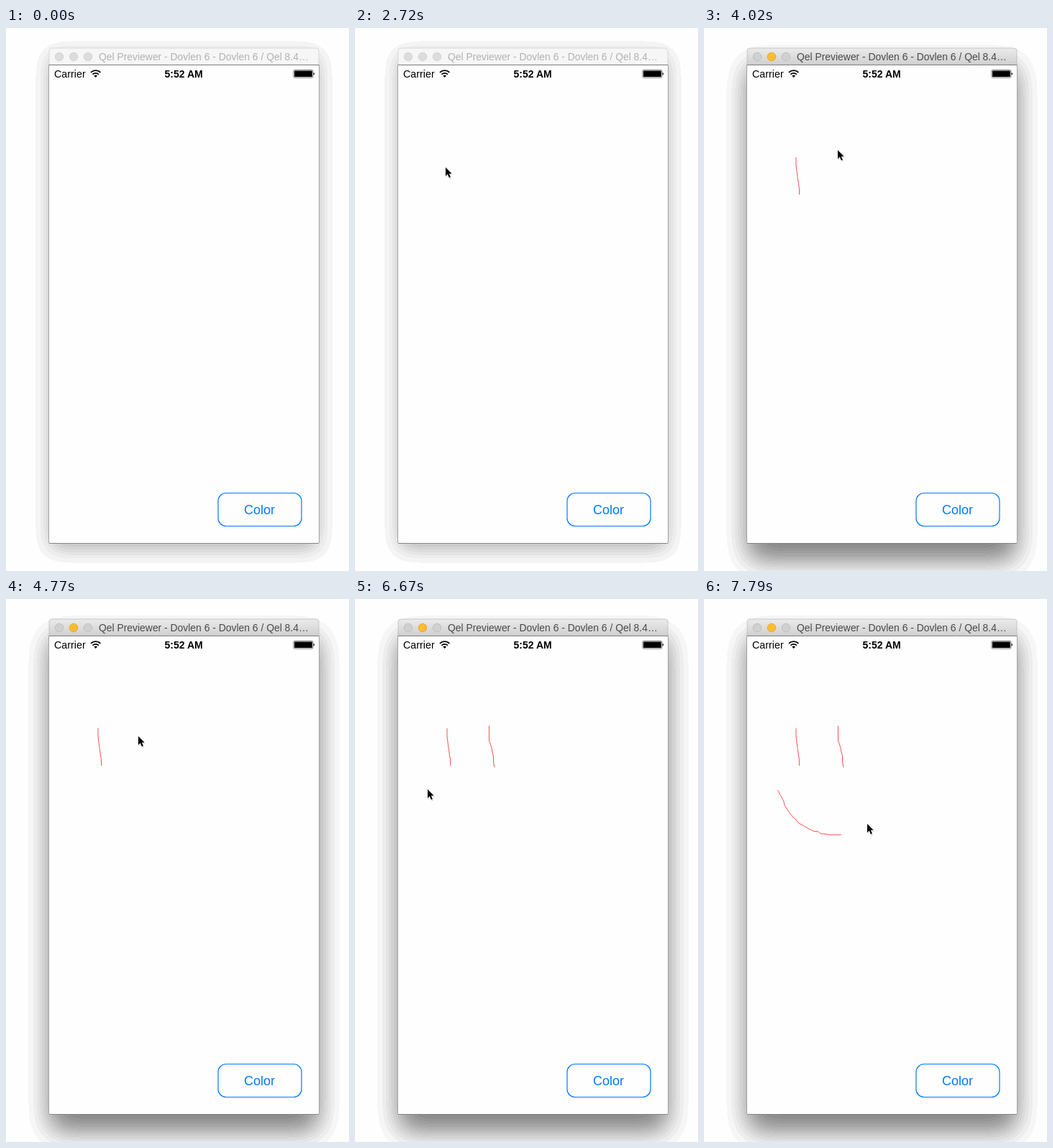
Write an HTML page that moves like this. It is 477 px wide and 756 px high and loops after 8000 ms.

```html
<!DOCTYPE html>
<html lang="en">
<head>
<meta charset="utf-8">
<title>Drawing app</title>
<style>
html, body { margin: 0; width: 100%; height: 100%; overflow: hidden; background: #fefefe; }
svg { display: block; width: 477px; height: 756px; font-family: "Liberation Sans", Arial, sans-serif; }

.idle, .active, .cursor, .stroke { animation: 8s step-end infinite; }
.idle { animation-name: hide; }
.active { animation-name: show; }
.cursor { animation-name: move; }
.stroke { fill: none; stroke: #fa5252; stroke-width: 1; stroke-dasharray: 1 3; stroke-dashoffset: 1.02; }
.left-eye { animation-name: left-eye; }
.right-eye { animation-name: right-eye; }
.smile { animation-name: smile; }

/* the window gains focus */
@keyframes hide { 0% { opacity: 1 } 39.125% { opacity: 0 } 100% { opacity: 0 } }
@keyframes show { 0% { opacity: 0 } 39.125% { opacity: 1 } 100% { opacity: 1 } }

@keyframes move {
  0% { transform: translate(-40px, 0) }
  17.125% { transform: translate(376px, 264px) }
  21.25% { transform: translate(186px, 198px) }
  23.125% { transform: translate(127px, 180px) }
  27.25% { transform: translate(124px, 179px) }
  34% { transform: translate(124px, 193px) }
  39.125% { transform: translate(130px, 231px) }
  46.25% { transform: translate(146px, 213px) }
  48.125% { transform: translate(171px, 184px) }
  50.25% { transform: translate(184px, 169px) }
  54% { transform: translate(183px, 172px) }
  55.875% { transform: translate(182px, 175px) }
  59.625% { transform: translate(182px, 190px) }
  61.5% { transform: translate(185px, 205px) }
  63.5% { transform: translate(188px, 218px) }
  65.5% { transform: translate(190px, 229px) }
  67.625% { transform: translate(191px, 234px) }
  71.75% { transform: translate(191px, 235px) }
  73.625% { transform: translate(186px, 237px) }
  75.5% { transform: translate(152px, 261px) }
  77.375% { transform: translate(117px, 282px) }
  79.25% { transform: translate(100px, 283px) }
  81.125% { transform: translate(97px, 272px) }
  83.375% { transform: translate(99px, 264px) }
  87.125% { transform: translate(103px, 275px) }
  89.75% { transform: translate(124px, 306px) }
  92.375% { transform: translate(158px, 326px) }
  94.875% { transform: translate(187px, 328px) }
  97.375%, 100% { transform: translate(225px, 312px) }
}

/* ink trails the pointer by one step */
@keyframes left-eye { 0% { stroke-dashoffset: 1.02 } 42.125%, 100% { stroke-dashoffset: 0 } }
@keyframes right-eye {
  0% { stroke-dashoffset: 1.02 }
  61.5% { stroke-dashoffset: .75 }
  63.5% { stroke-dashoffset: .5 }
  65.5% { stroke-dashoffset: .27 }
  67.625% { stroke-dashoffset: .08 }
  71.75%, 100% { stroke-dashoffset: 0 }
}
@keyframes smile {
  0% { stroke-dashoffset: 1.02 }
  89.75% { stroke-dashoffset: .9 }
  92.375% { stroke-dashoffset: .58 }
  94.875% { stroke-dashoffset: .25 }
  97.375%, 100% { stroke-dashoffset: 0 }
}
</style>
</head>
<body>
<svg viewBox="0 0 477 756">
  <defs>
    <!-- blurred shadows cut into flat bands -->
    <filter id="soft" filterUnits="userSpaceOnUse" x="-60" y="-60" width="600" height="900">
      <feGaussianBlur stdDeviation="15"/>
      <feComponentTransfer>
        <feFuncA type="discrete" tableValues="0 .04 .07 .1 .135 .165 .2 .235 .27 .3"/>
      </feComponentTransfer>
    </filter>
    <filter id="deep" filterUnits="userSpaceOnUse" x="-60" y="-60" width="600" height="960">
      <feGaussianBlur stdDeviation="19.6"/>
      <feComponentTransfer>
        <feFuncA type="discrete" tableValues="0 .035 .07 .105 .14 .175 .21 .245 .28 .315 .35 .38 .41 .44 .47 .5"/>
      </feComponentTransfer>
    </filter>
    <linearGradient id="bar" x2="0" y2="1">
      <stop stop-color="#ebebeb"/>
      <stop offset="1" stop-color="#d0d0d0"/>
    </linearGradient>
    <path id="top" d="M60 51V32a4 4 0 0 1 4-4H431a4 4 0 0 1 4 4V51z"/>
    <text id="title" x="129" y="45" font-size="13.9">Qel Previewer - Dovlen 6 - Dovlen 6 / Qel 8.4…</text>
  </defs>

  <rect width="477" height="756" fill="#fefefe"/>

  <g class="idle">
    <rect x="60" y="37" width="375" height="689" filter="url(#soft)"/>
    <use href="#top" fill="#f6f6f6" stroke="#d2d2d2" stroke-width=".8"/>
    <g fill="#dcdcdc" stroke="#d0d0d0" stroke-width=".8">
      <circle cx="74" cy="40" r="5.8"/>
      <circle cx="94" cy="40" r="5.8"/>
      <circle cx="114" cy="40" r="5.8"/>
    </g>
    <use href="#title" fill="#b2b2b2"/>
  </g>

  <g class="active">
    <rect x="60" y="52" width="375" height="689" filter="url(#deep)"/>
    <use href="#top" fill="url(#bar)" stroke="#bdbdbd" stroke-width=".8"/>
    <g fill="#d0d0d0" stroke="#b9b9b9" stroke-width=".8">
      <circle cx="74" cy="40" r="5.8"/>
      <circle cx="94" cy="40" r="5.8" fill="#fdbc30" stroke="#dfa02c"/>
      <circle cx="114" cy="40" r="5.8"/>
    </g>
    <use href="#title" fill="#4a4a4a"/>
  </g>

  <rect x="60" y="51" width="375" height="666" fill="#fefefe"/>
  <path d="M59.5 51V717M435.5 51V717" stroke="#a4a4a4"/>
  <path d="M60 51.5H435M60 717.5H435" stroke="#858585"/>

  <text x="67" y="69" font-size="14.3">Carrier</text>
  <g fill="none" stroke="#000" stroke-width="1.9">
    <path d="M118 61.9a9.5 9.5 0 0 1 13.4 0"/>
    <path d="M120.5 64.6a6 6 0 0 1 8.4 0"/>
    <path d="M124.7 69l-2.3-2.4a3.3 3.3 0 0 1 4.6 0z" fill="#000" stroke="none"/>
  </g>
  <text x="220.5" y="69" font-size="14" font-weight="700">5:52 AM</text>
  <rect x="399.9" y="58.4" width="27" height="10.8" rx="1.6" fill="#fefefe" stroke="#555" stroke-width=".8"/>
  <rect x="401" y="59.5" width="24.8" height="8.6" rx=".6"/>
  <path d="M427.6 62q1.4.2 1.4 1.8t-1.4 1.8z"/>

  <rect x="295" y="647.5" width="116" height="46" rx="11" fill="none" stroke="#007aff" stroke-width="1.2"/>
  <text x="331" y="677" font-size="18" fill="#007aff">Color</text>

  <path class="stroke left-eye" pathLength="1" d="M128 180V191L130 207L132.5 224V232"/>
  <path class="stroke right-eye" pathLength="1" d="M186.5 176.500V197L190 207L190.500 211L192.500 219V227L194 234.500"/>
  <path class="stroke smile" pathLength="1" d="M102 266L104 268L105 272L107 274L111 282L112 287L117 295L120 299L124 304L128 307L131 311.500L139 316L146 320L153 323.500H158L163 327H168L175 328.300H191"/>

  <g class="cursor">
    <path d="M2 1.500V14L4.900 11.300L7 16.300L9.200 15.400L7.100 10.600H11z" fill="#777" opacity=".4" transform="translate(.6 1)"/>
    <path d="M2 1V13.200L4.800 10.600L6.900 15.500L8.900 14.600L6.900 9.800H10.700z" stroke="#fefefe" stroke-width="1.500" paint-order="stroke"/>
  </g>
</svg>
</body>
</html>
```
